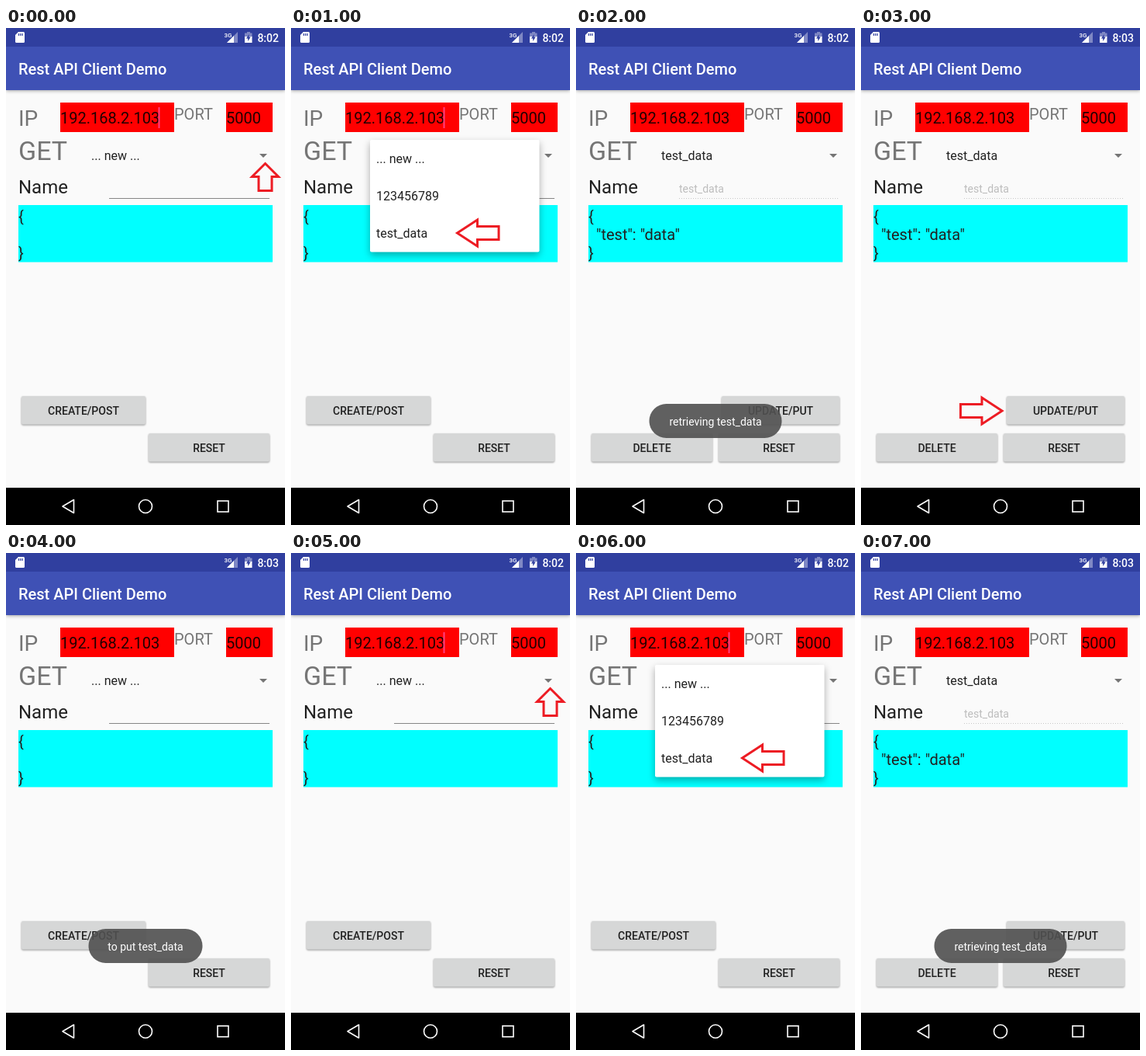
An HTML page for the animation above (8000 ms loop, 360 by 640 pixels).

```html
<!DOCTYPE html>
<html lang="en">
<head>
<meta charset="utf-8">
<title>Rest API Client Demo</title>
<style>
  html, body { margin: 0; width: 100%; height: 100%; overflow: hidden; background: #fafafa; }
  svg { display: block; width: 360px; height: 640px; font-family: Roboto, sans-serif; }
  text { fill: #212121; }
  .dim { fill: #757575; }
  .white { fill: #fff; }
  .medium { font-weight: 500; }
  .s14 { font-size: 14px; }
  .s16 { font-size: 16px; }
  .s20 { font-size: 20px; }
  .bar { filter: drop-shadow(0 1px 2px rgba(0, 0, 0, .35)); }
  .button rect { fill: #d6d7d7; filter: drop-shadow(0 1px 1.2px rgba(0, 0, 0, .4)); }
  .button text { font-size: 14px; font-weight: 500; text-anchor: middle; }
  .popup rect { fill: #fff; filter: drop-shadow(0 4px 5px rgba(0, 0, 0, .32)); }
  .arrow { fill: none; stroke: #ed1c24; stroke-width: 3; }
  .toast text { fill: #fff; font-size: 14px; text-anchor: middle; }
</style>
</head>
<body>
<svg id="stage" viewBox="0 0 360 640">
  <rect width="360" height="640" fill="#fafafa"/>
  <rect class="bar" y="24" width="360" height="56" fill="#3f51b5"/>
  <rect width="360" height="24" fill="#303f9f"/>

  <path fill="#fff" d="M16 5h6.5q1.500 0 1.500 1.500v11q0 1.500-1.500 1.500h-9q-1.500 0-1.500-1.500V9z"/>
  <path stroke="#303f9f" stroke-width="1.200" d="M16.500 7v3M18.800 7v3M21.100 7v3"/>
  <text class="white medium" x="281.500" y="11.500" font-size="8">3G</text>
  <path fill="#7f88c4" d="M299 5v14h-14z"/>
  <path fill="#fff" d="M294 10v9h-9z"/>
  <path fill="#7f88c4" d="M311 5h4v1.500h2.500V12h-9.500V6.500h3z"/>
  <path fill="#fff" d="M308 11h9.500v8H308z"/>
  <path fill="#303f9f" d="M313.500 8l-3.500 5.500h2.200V17l3.500-5.500h-2.200z"/>
  <text id="clock" class="white medium s14" x="352" y="17.500" text-anchor="end"></text>
  <text class="white medium s20" x="16" y="60">Rest API Client Demo</text>

  <text class="dim" x="16" y="126" font-size="28">IP</text>
  <rect x="70" y="96" width="147" height="38" fill="red"/>
  <text class="s20" x="70" y="123" style="fill:#210000">192.168.2.103</text>
  <rect id="caret" x="196.500" y="102" width="2" height="27" fill="#ff4081"/>
  <text class="dim s20" x="217" y="118">PORT</text>
  <rect x="284" y="96" width="60" height="38" fill="red"/>
  <text class="s20" x="284" y="123" style="fill:#210000">5000</text>

  <text class="dim" x="16" y="170" font-size="34">GET</text>
  <text id="choice" class="s16" x="110" y="170"></text>
  <path fill="#757575" d="M327 162h10l-5 5z"/>
  <text x="16" y="213" font-size="24">Name</text>
  <rect x="16" y="228" width="328" height="73.500" fill="#0ff"/>
  <text class="s20" x="16" y="249.500">{</text>
  <text class="s20" x="16" y="296.500">}</text>

  <g id="blank">
    <path stroke="#868686" d="M133 219.500h207"/>
  </g>
  <g id="loaded">
    <text class="s14" x="133" y="212" style="fill:#bdbdbd">test_data</text>
    <path stroke="#c8c8c8" stroke-dasharray="1 2" d="M133 219.500h207"/>
    <text class="s20" x="26" y="273">"test": "data"</text>
  </g>

  <g id="popup" class="popup">
    <rect x="102" y="144" width="218.500" height="144.500" rx="2"/>
    <text class="s16" x="110" y="174">... new ...</text>
    <text class="s16" x="110" y="222">123456789</text>
    <text class="s16" x="110" y="270">test_data</text>
  </g>

  <path id="arrow" class="arrow" d="M0 0L17-17V-8.500H35V8.500H17V17z" transform="translate(0 0)"/>

  <g id="toast" class="toast">
    <rect y="484" height="44" rx="22" fill="#505050" opacity=".9"/>
    <text x="180" y="511.500"></text>
  </g>

  <path d="M0 592h360v48H0z"/>
  <g fill="none" stroke="#fff" stroke-width="1.600">
    <path d="M73 616l14.500-8.500v17z" stroke-linejoin="round"/>
    <circle cx="180" cy="616" r="8.500"/>
    <rect x="273" y="609" width="14" height="14"/>
  </g>
</svg>
<script>
const $ = id => document.getElementById(id);
const show = (node, on) => { node.style.display = on ? '' : 'none'; };

function button(group, label, x, y, w) {
  group.insertAdjacentHTML('beforeend',
    `<g class="button"><rect x="${x}" y="${y}" width="${w}" height="36.500" rx="2"/>` +
    `<text x="${x + w / 2}" y="${y + 24}">${label}</text></g>`);
}
button($('blank'), 'CREATE/POST', 20, 474, 160);
button($('loaded'), 'UPDATE/PUT', 188, 474, 152);
button($('loaded'), 'DELETE', 20, 522, 156);
for (const id of ['blank', 'loaded']) button($(id), 'RESET', 184, 522, 156);

// Arrow tips with the direction they point in
const arrows = {
  menu: 'translate(334.500 174.500) rotate(90)',
  item: 'translate(214.500 264) scale(1.530 1)',
  put: 'translate(182 493) scale(-1.530 1)'
};
const open = { clock: '8:02', arrow: 'menu', caret: true };
const pick = { clock: '8:02', arrow: 'item', caret: true, popup: true };
const fetched = { clock: '8:02', loaded: true, toast: 'retrieving test_data', pill: 171 };
const steps = [
  open, pick, fetched,
  { clock: '8:03', loaded: true, arrow: 'put' },
  { clock: '8:03', toast: 'to put test_data', pill: 147 },
  open, pick, { ...fetched, clock: '8:03' }
];

function draw(s) {
  $('clock').textContent = s.clock;
  $('choice').textContent = s.loaded ? 'test_data' : '... new ...';
  show($('caret'), s.caret);
  show($('blank'), !s.loaded);
  show($('loaded'), s.loaded);
  show($('popup'), s.popup);
  show($('arrow'), s.arrow);
  if (s.arrow) $('arrow').setAttribute('transform', arrows[s.arrow]);
  $('arrow').setAttribute('vector-effect', 'non-scaling-stroke');
  show($('toast'), s.toast);
  if (s.toast) {
    const [pill, label] = $('toast').children;
    pill.setAttribute('x', 180 - s.pill / 2);
    pill.setAttribute('width', s.pill);
    label.textContent = s.toast;
  }
}

const start = performance.now();
let current = -1;
function tick() {
  const i = Math.floor((performance.now() - start) / 1000) % steps.length;
  if (i !== current) draw(steps[current = i]);
  requestAnimationFrame(tick);
}
tick();
</script>
</body>
</html>
```
